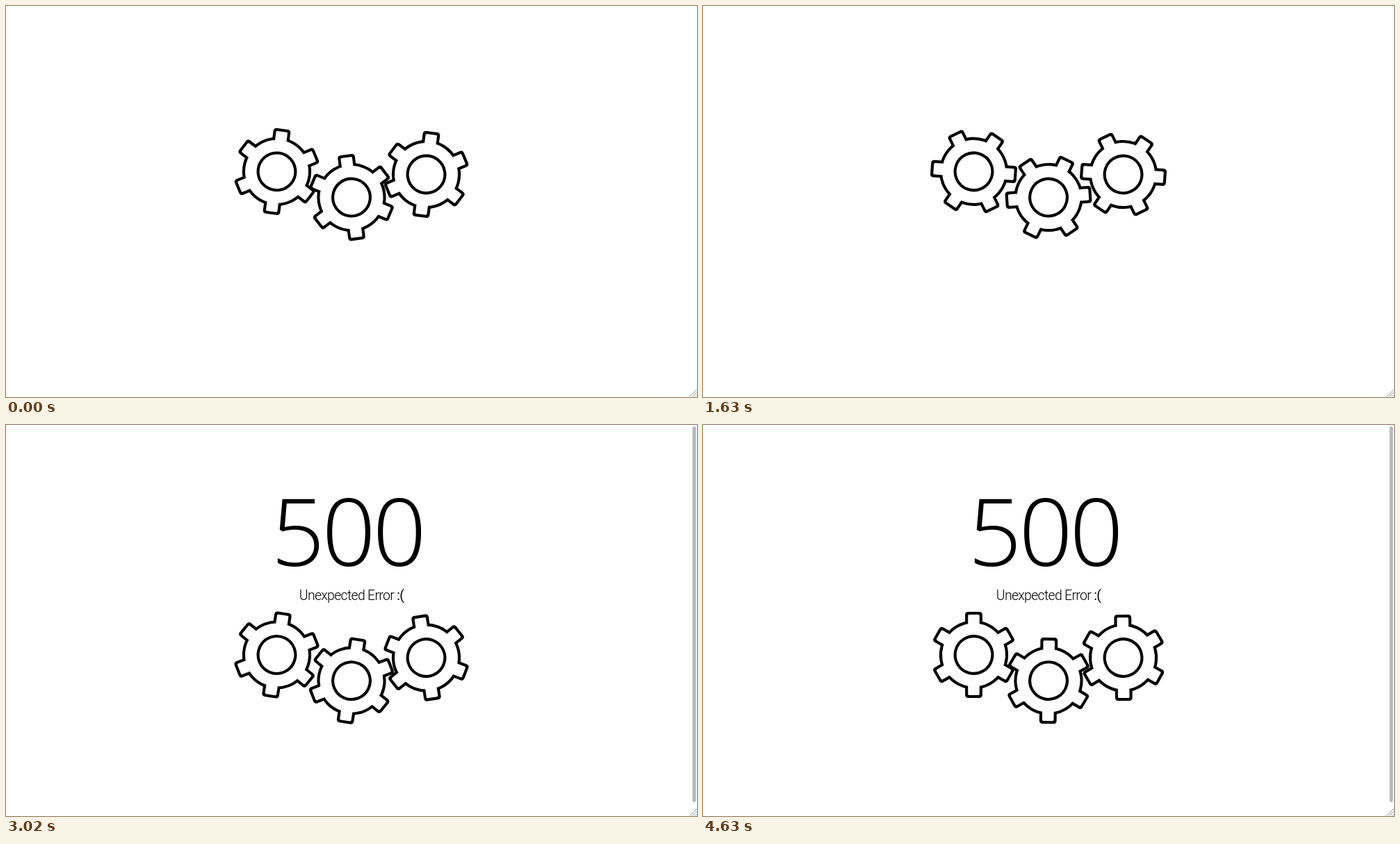
These frames come from a looping animation (994x563 px, 5.13 s). An HTML page:

```html
<!DOCTYPE html>
<html lang="en">
<head>
<meta charset="utf-8">
<title>500</title>
<style>
  html, body { margin: 0; width: 100%; height: 100%; overflow: hidden; background: #fff; }
  svg { display: block; width: 100%; height: 100%; }
  text { text-anchor: middle; }
  #code { font: 300 135px "Open Sans", sans-serif; letter-spacing: -4px; }
  #message { font: 300 19.5px Roboto, sans-serif; letter-spacing: -.7px; }
  #message tspan { font-weight: 400; }
</style>
</head>
<body>
<svg viewBox="0 0 994 563">
  <defs>
    <g id="bar">
      <rect x="-75" y="-15" width="150" height="30" rx="5"/>
      <rect x="-70" y="-10" width="140" height="20" rx="2" fill="#fff"/>
    </g>
    <g id="gear">
      <circle r="60"/>
      <use href="#bar"/>
      <use href="#bar" transform="rotate(60)"/>
      <use href="#bar" transform="rotate(120)"/>
      <circle r="55" fill="#fff"/>
      <circle r="32.5" fill="#fff" stroke="#000" stroke-width="5"/>
    </g>
  </defs>
  <text id="code" x="491" y="202.5">500</text>
  <text id="message" x="497" y="252">Unexpected Error <tspan>:(</tspan></text>
  <g id="gears">
    <use href="#gear"/>
    <use href="#gear"/>
    <use href="#gear"/>
  </g>
  <rect id="scrollbar" x="987.5" y="2" width="5" height="541" rx="2.5" fill="#b8b8b8"/>
  <path d="M983.5 562.5l10-10m-6 10l6-6m-2 6l2-2" stroke="#8a8a8a" stroke-width=".9"/>
</svg>
<script>
const LOOP = 5130;
const RATE = 1.0567;      // page time per loop time
const ERROR_AT = 1661;
const SCALE = 0.827;
const places = [[-130, 0], [0, 45], [130, 5]];

// Evenly spaced screen updates: first, last, count
const runs = [
  [0, 560, 12], [620, 1130, 10], [1190, 1690, 9], [1750, 1990, 5], [2050, 2250, 5],
  [2310, 2780, 9], [2840, 3320, 9], [3380, 3870, 9], [3930, 4450, 10], [4510, 4630, 3]
];
const updates = runs.flatMap(([first, last, count]) =>
  Array.from({ length: count }, (_, i) =>
    Math.round((first + (last - first) * i / (count - 1)) / 10) * 10));

const $ = id => document.getElementById(id);
const gears = [...$("gears").children];

function angles(t) {
  if (t < ERROR_AT) {
    const turn = 37.4 + t * RATE * 0.12;
    return [turn, -turn, turn];
  }
  const c = (t - ERROR_AT) * RATE / 2000 % 1;
  const swing = 30 * Math.min(1, c / 0.2, (1 - c) / 0.4);
  const jam = swing - 5 * Math.max(0, 1 - Math.abs(c - 0.4) / 0.2);
  return [-swing, -jam, jam];
}

function draw(t) {
  const p = Math.min(1, Math.max(0, (t - ERROR_AT) * RATE / 500));
  const codeY = SCALE * (Math.max(8, 100 * p) - 100);
  const restY = codeY - SCALE * 20 * (1 - p);

  $("code").setAttribute("transform", `translate(0 ${codeY})`);
  $("message").setAttribute("transform", `translate(0 ${restY})`);
  $("code").setAttribute("opacity", p);
  $("message").setAttribute("opacity", p);
  $("gears").setAttribute("transform", `translate(497 ${331 + restY}) scale(${SCALE})`);

  const turns = angles(t);
  gears.forEach((gear, i) =>
    gear.setAttribute("transform", `translate(${places[i]}) rotate(${turns[i]})`));

  $("scrollbar").setAttribute("visibility", p > 0.85 ? "visible" : "hidden");
  $("scrollbar").setAttribute("height", 541 + 50 * (1 - p));
}

function tick() {
  const now = performance.now() % LOOP;
  draw(updates.findLast(t => t <= now));
  requestAnimationFrame(tick);
}
tick();
</script>
</body>
</html>
```
